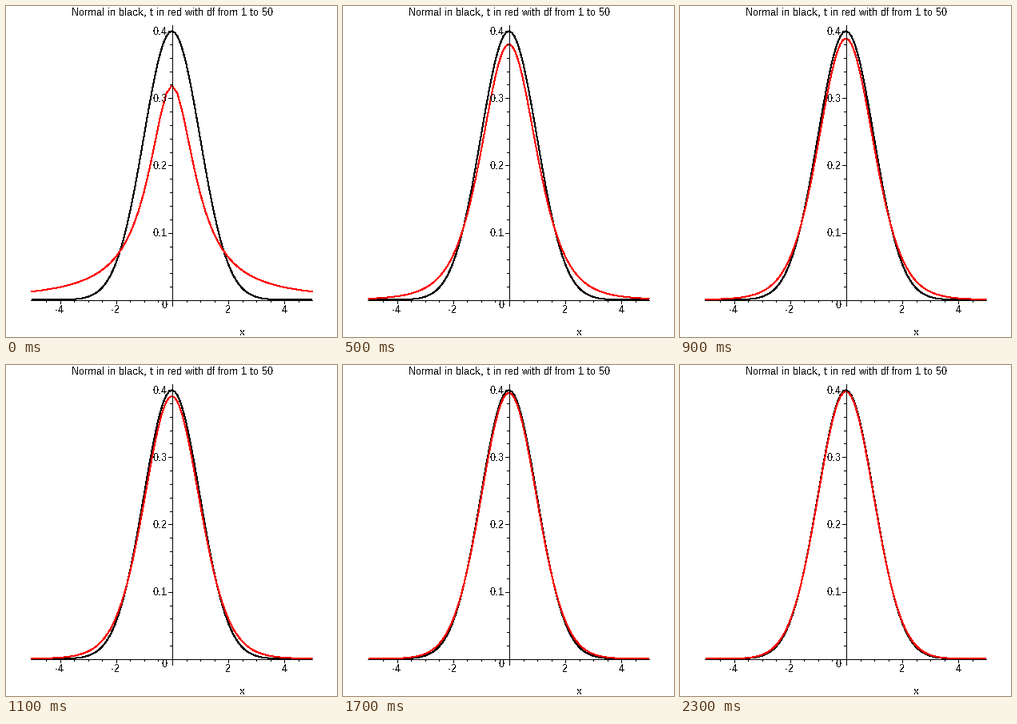
Recreate the animation shown at these times as a matplotlib script. Size 414 by 414 pixels, loop 2400 ms.

```python
import math

import matplotlib.pyplot as plt
import numpy as np
from matplotlib.animation import FuncAnimation

SIZE, DPI = 414, 72         # at 72 dpi one point is one pixel
X0, Y0 = 207, 367           # pixel position of the plot's zero point
XS, YS = 35.1, 842.5        # pixels per unit

plt.rcParams.update({
    "font.family": "Liberation Sans",
    "font.size": 13,
    "text.antialiased": False,
    "text.hinting": "native",
    "text.hinting_factor": 1,
})

fig = plt.figure(figsize=(SIZE / DPI, SIZE / DPI), dpi=DPI, facecolor="white")
ax = fig.add_axes([0, 0, 1, 1])
ax.set_xlim(-0.5, SIZE - 0.5)
ax.set_ylim(SIZE - 0.5, -0.5)
ax.axis("off")


def line(xs, ys, color="black", z=3):
    return ax.plot(xs, ys, color=color, lw=1, antialiased=False, zorder=z,
                   solid_capstyle="butt", solid_joinstyle="round")[0]


def label(x, y, s, ha="center"):
    ax.text(x, y, s, ha=ha, va="baseline", color="black", zorder=4)


def to_px(x, y):
    return X0 + XS * x, Y0 - YS * y


def normal(x):
    return np.exp(-x * x / 2) / math.sqrt(2 * math.pi)


def student(x, df):
    c = math.exp(math.lgamma((df + 1) / 2) - math.lgamma(df / 2))
    return c / math.sqrt(df * math.pi) * (1 + x * x / df) ** (-(df + 1) / 2)


# Axes and ticks
line([30.5, 382.5], [Y0, Y0])
line([X0, X0], [23.5, 374.5])
for i in range(-9, 10):
    x = round(X0 + XS * i / 2)
    line([x, x], [Y0, Y0 + (4.5 if i % 4 == 0 else 2.5)])
for i in range(1, 21):
    y = round(Y0 - YS * i / 50)
    line([X0 - (4.5 if i % 5 == 0 else 2.5), X0], [y, y])

# Lettering
label(207, 11, "Normal in black, t in red with df from 1 to 50")
for v in (-4, -2, 2, 4):
    label(X0 + XS * v, 383, str(v))
for i in range(1, 5):
    label(201, round(Y0 - YS * i / 10) + 5, f"0.{i}", "right")
label(201, 378, "0", "right")
label(294.5, 411, "x")

# Curves
fine = np.linspace(-5, 5, 101)
coarse = fine[::2]
line(*to_px(fine, normal(fine)), z=1)
t_curve = line([], [], "red", 2)


def update(i):
    df = np.interp(i, [1, 15, 19, 23], [1, 15, 35, 50])
    x = coarse if df == 1 else fine
    t_curve.set_data(*to_px(x, student(x, df)))
    return t_curve,


anim = FuncAnimation(fig, update, frames=24, interval=100, repeat=True,
                     repeat_delay=0, blit=False)
plt.show()
```
